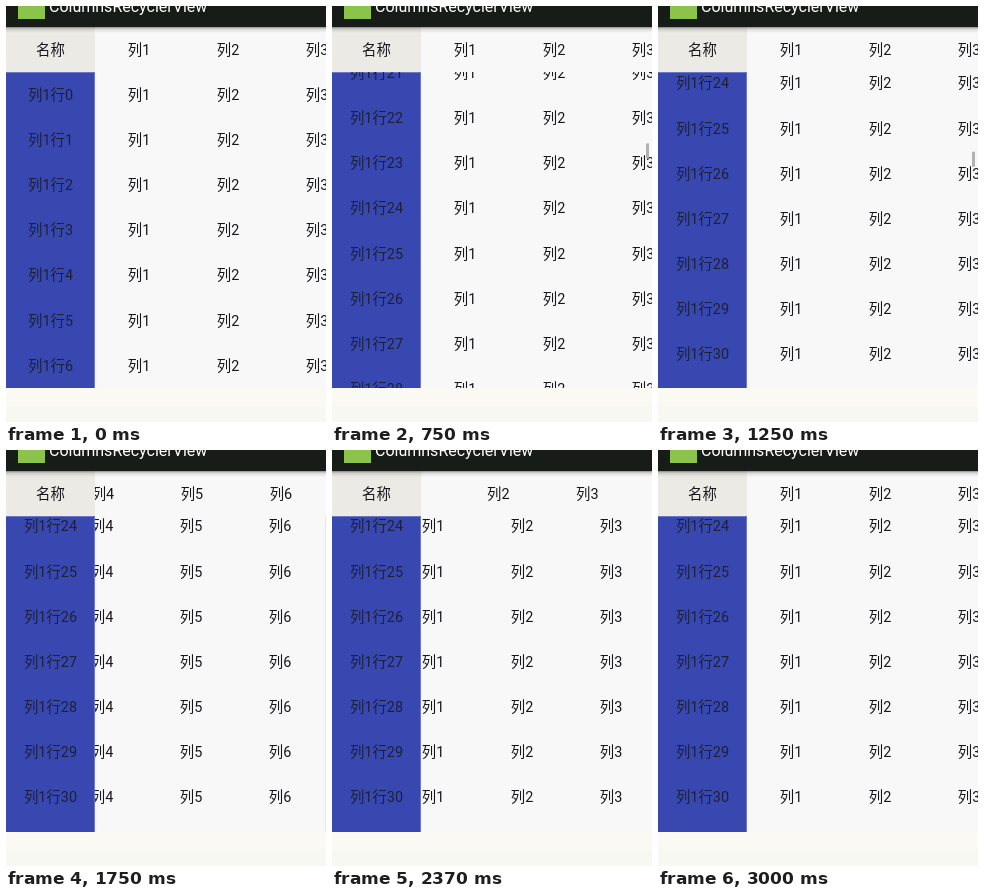
These frames come from a looping animation (320x416 px, 3120 ms). An HTML page:

```html
<!DOCTYPE html>
<html lang="zh-CN">
<head>
<meta charset="utf-8">
<title>ColumnsRecyclerView</title>
<style>
  html, body { margin: 0; width: 100%; height: 100%; overflow: hidden; background: #faf9f4; }
  #stage { position: relative; width: 320px; height: 416px; overflow: hidden; background: #faf9f4;
    font: 14.4px/45px Roboto, "Noto Sans CJK SC", "Noto Sans CJK", sans-serif; color: #16171a; }
  #stage div { position: absolute; }
  #foot { left: 0; top: 400px; width: 320px; height: 16px; background: #f7f8f2; }
  #bar { left: 0; top: 0; width: 320px; height: 21px; background: #181c19; }
  #shade { left: 0; top: 21px; width: 320px; height: 6px;
    background: linear-gradient(rgba(0,0,0,.42), rgba(0,0,0,.12) 35%, rgba(0,0,0,0)); }
  #icon { left: 12px; top: 0; width: 27px; height: 13px; background: #8cc34b; }
  #title { left: 43px; top: -9px; font-size: 16px; line-height: 20px; color: #fff; white-space: nowrap; }
  #head { left: 0; top: 21px; width: 320px; height: 45px; overflow: hidden; background: #f8f8f8; }
  #headCols { left: 0; top: 1px; }
  #name { left: 0; top: 0; width: 89px; height: 45px; line-height: 47px; text-align: center; background: #ebeae5; }
  #list { left: 0; top: 66px; width: 320px; height: 316px; overflow: hidden; background: #e6e7e8; }
  #cells { left: 0; top: 0; width: 622.5px; height: 316px; background: #f8f8f8; }
  #side { left: 0; top: 0; width: 89px; height: 316px; overflow: hidden; background: #3848b0; color: #1c2138;
    box-shadow: inset -1px 1px #6d78c4; }
  .row { left: 0; height: 45px; }
  .cell { top: 0; width: 89px; height: 45px; text-align: center; white-space: nowrap; }
  #thumb { left: 314px; top: 0; width: 3px; height: 15px; background: #b2b2b2; }
</style>
</head>
<body>
<div id="stage">
  <div id="foot"></div>
  <div id="head">
    <div id="headCols"></div>
    <div id="name">名称</div>
  </div>
  <div id="list">
    <div id="cells"><div id="cellRows"></div></div>
    <div id="side"><div id="sideRows"></div></div>
  </div>
  <div id="thumb"></div>
  <div id="shade"></div>
  <div id="bar"><div id="icon"></div><div id="title">ColumnsRecyclerView</div></div>
</div>
<script>
  const LOOP = 3120, STEPS = 25;
  const PITCH = 45.1, ROWS = 32, COLS = 6, COL_W = 89;
  const MAX_X = 304, MAX_Y = 1094.7, HEAD_LAG = 45;
  const $ = id => document.getElementById(id);

  const clamp = v => Math.min(1, Math.max(0, v));
  const progress = (t, from, to) => clamp((t - from) / (to - from));
  const smooth = u => u * u * (3 - 2 * u);

  // A fling that slows to rest, then a drag to the last column and back
  const scrollY = t => MAX_Y * (1 - (1 - progress(t, 41, 1370)) ** 2.84);
  const scrollX = t => MAX_X * (smooth(progress(t, 1250, 1720)) - smooth(progress(t, 1870, 2496)));

  function add(parent, cls, text = "") {
    const el = document.createElement("div");
    el.className = cls;
    el.textContent = text;
    parent.appendChild(el);
    return el;
  }

  function addColumns(parent) {
    for (let c = 0; c < COLS; c++)
      add(parent, "cell", "列" + (c + 1)).style.left = 88.5 + c * COL_W + "px";
  }

  addColumns($("headCols"));
  for (let r = 0; r < ROWS; r++) {
    const top = 1 + r * PITCH + "px";
    const row = add($("cellRows"), "row");
    row.style.top = top;
    addColumns(row);
    add($("sideRows"), "cell", "列1行" + r).style.top = top;
  }

  const move = (id, x, y) => $(id).style.transform = `translate(${x}px, ${y}px)`;

  function draw(t) {
    const y = scrollY(t);
    move("cells", -scrollX(t), 0);
    move("headCols", -scrollX(t - HEAD_LAG), 0);
    move("cellRows", 0, -y);
    move("sideRows", 0, -y);
    move("thumb", 0, 73 + y * .0665);
    $("thumb").style.opacity = y > 0 ? 1 - progress(t, 1300, 1620) : 0;
  }

  // The picture advances eight times a second, on 10 ms marks
  function tick() {
    const t = performance.now() % LOOP;
    const step = Math.min(STEPS - 1, Math.floor((t + 5) / 125));
    draw(Math.floor(step * 12.5) * 10);
    requestAnimationFrame(tick);
  }
  tick();
</script>
</body>
</html>
```
